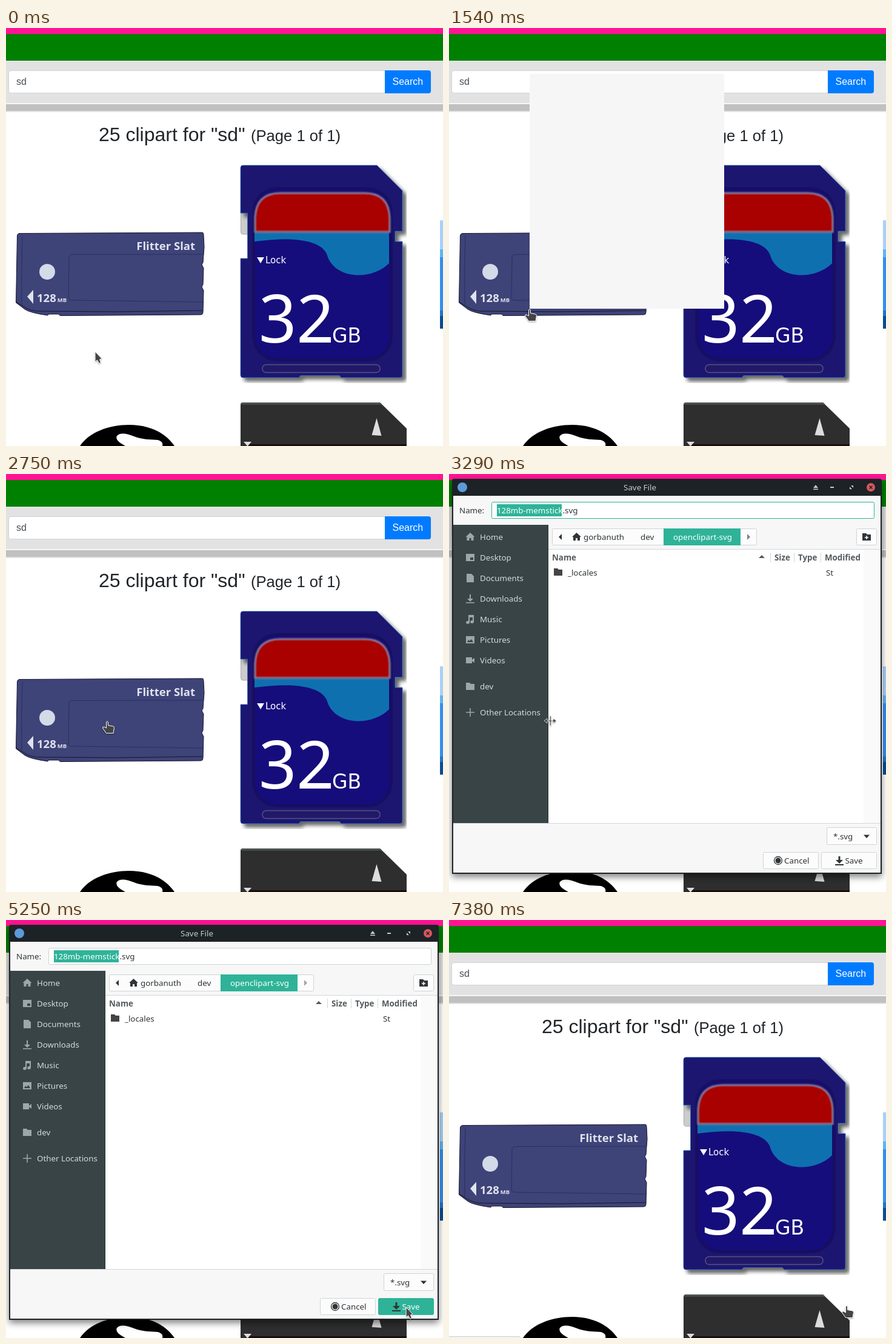
Recreate the animation shown at these times as an HTML page. Size 721 by 691 pixels, loop 7430 ms.

```html
<!DOCTYPE html>
<html lang="en">
<head>
<meta charset="utf-8">
<title>Save clipart</title>
<style>
html, body { margin: 0; width: 100%; height: 100%; overflow: hidden; background: #fff; }
svg { display: block; }
.page { font: 16px "Liberation Sans", Arial, sans-serif; fill: #212529; }
.ui { font: 13.33px "Noto Sans", sans-serif; fill: #2f3437; }
.stick text { font-family: "Noto Sans", sans-serif; font-weight: 700; fill: #dfe3ee; }
.card text { font-family: "DejaVu Sans", sans-serif; fill: #fff; }
.card .size { font-family: "Noto Sans", sans-serif; }
.btn { fill: #fcfcfc; stroke: #cfd3d4; }
.head { font-weight: 700; fill: #555b5e; }
.side { fill: #d3dadb; }
.icon { fill: #9ba8a8; }
.on { fill: #2eb398; }
.focus { stroke: #2eb398; }
.white { fill: #fff; }
#cursor path { fill: #444; stroke: #fff; stroke-linejoin: round; }
</style>
</head>
<body>
<svg width="721" height="691" viewBox="0 0 721 691">
  <defs>
    <filter id="soft" x="-10%" y="-10%" width="120%" height="120%"><feGaussianBlur stdDeviation="1"/></filter>
    <filter id="cardShade"><feDropShadow dx="6" dy="6" stdDeviation="3" flood-opacity=".6"/></filter>
    <filter id="winShade"><feDropShadow dx="0" dy="5" stdDeviation="6" flood-opacity=".5"/></filter>
    <filter id="menuShade"><feDropShadow dx="2" dy="0" stdDeviation="2" flood-opacity=".35"/></filter>
    <filter id="tiny" x="-50%" y="-50%" width="200%" height="200%"><feDropShadow dx="0" dy="1" stdDeviation="1" flood-opacity=".4"/></filter>
    <clipPath id="thumb"><path d="M380 220H661V587H380Z"/></clipPath>
  </defs>

  <g class="page">
    <path fill="#fff" d="M0 0H721V691H0Z"/>
    <path fill="#ff1493" d="M0 0H721V10H0Z"/>
    <path fill="#008000" d="M0 10H721V54H0Z"/>
    <path fill="#e2e2e2" d="M0 54H721V139H0Z"/>
    <path fill="#f6f6f6" d="M0 124H721V126H0Z"/>
    <path fill="#c0c0c0" d="M0 126H721V137H0Z"/>
    <rect x="4.5" y="70.5" width="625" height="37" rx="4" fill="#fff" stroke="#ced4da"/>
    <path fill="#007bff" d="M625 70H697q4 0 4 4V104q0 4-4 4H625Z"/>
    <text x="17" y="94" fill="#495057">sd</text>
    <text x="637.5" y="94" class="white">Search</text>
    <text x="153" y="187" font-size="32">25 clipart for "sd"</text>
    <text x="404" y="187" font-size="25.6">(Page 1 of 1)</text>

    <g class="stick">
      <path fill="#3e4378" stroke="#15172c" d="M18.500 343Q19 340 22 339.500L324 338Q326 338 326 342L327 362L325 388L323 391L326 397L325 424L323 428L326 434L325 470Q325 474 321 474L89 475.500L87 473H70L69 475Q40 471 31 465L16.500 454Z"/>
      <path fill="none" stroke="#15172c" d="M17 453L30 461Q37 466 50 468L180 469L325 467"/>
      <path fill="none" stroke="#2b3062" d="M27 343Q25 400 26 458M325 374L108 374.500Q104 375 104 380L103 445Q103 450 108 450L325 453"/>
      <circle cx="68" cy="403" r="13" fill="#d3dae8"/>
      <path fill="#dfe3ee" d="M35 444L45 433V456Z"/>
      <text x="312" y="367" font-size="18.500" text-anchor="end">Flitter Slat</text>
      <text x="51" y="453" font-size="18.500">128<tspan dx="2" font-size="9.500">MB</tspan></text>
    </g>

    <g class="card" clip-path="url(#thumb)">
      <path fill="#ccc" stroke="#aaa" d="M387.500 306H400V341H391Q387.500 341 387.500 337Z"/>
      <path fill="#1e1570" stroke="#2b6cb4" stroke-width=".8" filter="url(#cardShade)" d="M391 227H612L654 269V336H642V353H654V574Q654 578 650 578H553L550 574.500H486L483 578H391Q387 578 387 574V381H398.500V306H387V231Q387 227 391 227Z"/>
      <rect x="409" y="266" width="226" height="282" rx="38" fill="#170f7b" stroke="#120c55" stroke-width="3" filter="url(#soft)"/>
      <path fill="#0f70af" d="M410 338H632V389C604 417 546 416 531 379C524 350 475 344 410 353Z"/>
      <path fill="#a90000" d="M411 337V313Q413 273 452 273H592Q631 273 633 313V337Z"/>
      <path fill="none" stroke="#8c819c" stroke-width="3" filter="url(#soft)" d="M411 337V313Q413 273 452 273H592Q631 273 633 313V337Z"/>
      <rect x="423" y="556.500" width="194" height="13" rx="6" fill="#211968" stroke="#575184" stroke-width="1.500"/>
      <path fill="#fff" d="M414 379H426L420 389Z"/>
      <text x="428" y="389" font-size="15">Lock</text>
      <text class="size" x="417" y="520" font-size="109">32</text>
      <text x="538" y="520" font-size="33">GB</text>
    </g>

    <path fill="#a9d0fb" d="M716 318H721V366H716Z"/>
    <path fill="#62b3f4" d="M716 366H721V379H716Z"/>
    <path fill="#348ef0" d="M716 379H721V467H716Z"/>
    <path fill="#1f74cd" d="M716 467H721V476H716Z"/>
    <path fill="#0b4c92" d="M716 476H721V497H716Z"/>

    <path fill="#000" d="M122 691C137 668 170 656 203 656C238 656 264 670 278 691Z"/>
    <path fill="#fff" d="M197 691C188 686 181 682 182.500 675C187 668 199 670 211 675C226 681 240 680 250 681C258 683 259 687 258 691Z"/>
    <path fill="#2e2e2e" d="M391 619H617L661 662V691H387V623Q387 619 391 619Z"/>
    <path fill="#4c5352" d="M391 619H617L620.500 622.500H388Q388 619 391 619Z"/>
    <path fill="#1d0d0d" d="M400 688H661V691H400Z"/>
    <path fill="#ddd" d="M611.500 645L619.500 674L603.500 673ZM392 684H405L398.500 691.500Z"/>
    <path id="status" fill="#f2f2f2" stroke="#ccc" d="M-1 688.500H115Q118 688.500 118 693H-1Z"/>
  </g>

  <g id="menu" class="ui">
    <rect id="menuBox" x="133" y="76" width="321" height="388" fill="#f6f6f6"/>
    <g id="items"></g>
  </g>

  <g id="dialog" class="ui">
    <path fill="#1d2426" filter="url(#winShade)" d="M5 661V11Q5 8 8 8H711Q714 8 714 11V661Z"/>
    <path fill="#f7f7f7" d="M7 36H712V659H7Z"/>
    <circle cx="22" cy="22" r="8" fill="#5b9bd8"/>
    <text x="315" y="27" text-anchor="middle" fill="#c4cccd">Save File</text>
    <path fill="#c4cccd" d="M601 23L605 18L609 23ZM601 24.500H609V26H601ZM629 21H635V23H629ZM663 19H667V23ZM661 21V25H665Z"/>
    <circle cx="696" cy="22" r="7" fill="#d9575c"/>
    <path stroke="#1d2426" stroke-width="1.500" d="M693.500 19.500L698.500 24.500M698.500 19.500L693.500 24.500"/>

    <text x="17" y="65">Name:</text>
    <rect id="entry" class="btn white" x="70.500" y="46.500" width="631" height="27" rx="2"/>
    <path class="on" d="M79 50H186V70H79Z"/>
    <text x="79" y="65"><tspan class="white">128mb-memstick</tspan>.svg</text>

    <path fill="#fff" d="M164 125H684V577H164Z"/>
    <path fill="#fafafa" d="M684 125H712V577H684Z"/>
    <path fill="#394446" d="M7 84H164V577H7Z"/>
    <path stroke="#d2d6d7" d="M164 124.500H712M7 577.500H712M530.500 130V146M569.500 130V146M613.500 130V146"/>
    <path stroke="#2b3436" d="M163.500 84V577"/>
    <g id="places" class="side"></g>

    <rect class="btn" x="170.500" y="90.500" width="337" height="27" rx="2"/>
    <path class="on" d="M354 90H481V118H354Z"/>
    <path d="M186 99V109L181 104ZM203 104L210.500 97L218 104H216V110H212V106H209V110H205V104Z"/>
    <path id="next" fill="#7d8284" d="M492 99V109L497 104Z"/>
    <text x="222" y="109">gorbanuth</text>
    <text x="316" y="109">dev</text>
    <text x="370" y="109" class="white">openclipart-svg</text>
    <rect class="btn" x="672.500" y="90.500" width="33" height="27" rx="2"/>
    <path d="M682 98H688L690 100H696V110H682Z"/>
    <path stroke="#fff" stroke-width="1.500" d="M689 102V108M686 105H692"/>

    <g class="head">
      <text x="170" y="143">Name</text><text x="537" y="143">Size</text>
      <text x="576" y="143">Type</text><text x="620" y="143">Modified</text>
      <path d="M511 139L516 134L521 139Z"/>
    </g>
    <path d="M173 156H179L181 158H187V168H173Z" fill="#444"/>
    <text x="196" y="168">_locales</text>
    <text x="622" y="168">St</text>

    <rect class="btn" x="623.500" y="584.500" width="82" height="28" rx="2"/>
    <text x="634" y="604">*.svg</text>
    <path d="M684 596.500H694L689 602Z"/>
    <rect class="btn" x="518.500" y="625.500" width="91" height="27" rx="2"/>
    <circle cx="543" cy="639" r="6.500" fill="none" stroke="#2f3437" stroke-width="1.300"/>
    <circle cx="543" cy="639" r="4.500"/>
    <text x="553" y="644">Cancel</text>
    <rect id="save" class="btn" x="614.500" y="625.500" width="91" height="27" rx="2"/>
    <path d="M642.500 632H645.500V638H650L644 644L638 638H642.500ZM637 645H651V647H637Z"/>
    <text id="saveText" x="653.500" y="644">Save</text>
  </g>

  <g id="cursor" filter="url(#tiny)">
    <path id="arrow" d="M0 0V17L3.500 14L6.500 19.500L9.500 18L7.500 13L11 11.500Z"/>
    <path id="hand" d="M-1.500 2Q0 -.5 1.500 2V7.500L9.500 9Q11.500 9.500 11.500 11.500L10 20.500H-1.500L-7.500 12Q-8 9.500 -5 10L-1.500 12Z"/>
    <path id="resize" stroke-width=".7" d="M-.8 -8H1.200V-.8H5V-4L10 0L5 4V.8H1.200V8H-.8V.8H-5V4L-10 0L-5 -4V-.8H-.8Z"/>
  </g>
</svg>
<script>
const $ = id => document.getElementById(id);
const show = (id, on) => $(id).style.display = on ? '' : 'none';

// Sidebar: label, centre line, icon drawn around (0, 0)
const folder = 'M-7 -6H-1L1 -4H7V6H-7Z';
const places = [
  ['Home', 104, 'M-7.500 0L0 -7L7.500 0H5.500V6H1.500V2H-1.500V6H-5.500V0Z'],
  ['Desktop', 138, 'M-7 -6H7V6H-7ZM0 0V4H5V0Z'],
  ['Documents', 172, 'M-6 -7H2L6 -3V7H-6Z'],
  ['Downloads', 206, 'M-1 -7H1V0H5L0 5L-5 0H-1ZM-7 6H7V7.500H-7Z'],
  ['Music', 240, 'M-3 -7H6V4A3 2.500 0 1 1 4 2V-3H-1V5A3 2.500 0 1 1 -3 3Z'],
  ['Pictures', 274, 'M-7 -6H7V6H-7ZM-5 4H5L2 -1L-1 2L-3 0Z'],
  ['Videos', 308, 'M-7 -5H3V-1L7 -4V4L3 1V5H-7Z'],
  ['dev', 351, folder],
  ['Other Locations', 394, 'M-.8 -7H.8V-.8H7V.8H.8V7H-.8V.8H-7V-.8H-.8Z']
];
$('places').innerHTML = places.map(([name, y, d]) =>
  `<path class="icon" fill-rule="evenodd" transform="translate(35 ${y})" d="${d}"/><text x="51" y="${y + 5}">${name}</text>`).join('');

// Context menu: an empty label is a separator
const labels = ['Open link in new tab', 'Open link in new window', 'Open link in incognito window', '',
  'Save link as…', 'Copy link address', 'Copy link text', '',
  'Open image in new tab', 'Save image as…', 'Copy image', 'Copy image address', 'Search the web for image', '',
  'Save as SVG', '', 'Inspect'];
let rowY = 80;
const rows = labels.map(label => {
  const y = rowY;
  rowY += label ? 26 : 11;
  return { label, y };
});
$('items').innerHTML = rows.map(({ label, y }) => label
  ? `<g><rect x="133" y="${y}" width="320" height="26" fill="none"/><text x="157" y="${y + 18}">${label}</text></g>`
  : `<path stroke="#d5d8d9" d="M133 ${y + 5.5}H454"/>`).join('');

// Pointer moves: start, end, x, y, sideways bow
const moves = [
  [450, 1040, 133, 464, 31], [2030, 2420, 167, 408], [3610, 3920, 556, 587],
  [4079, 4080, 670, 641], [4289, 4290, 652, 643], [4450, 4540, 660, 640],
  [6780, 6920, 655, 640], [7379, 7380, 656, 637]
];
function pointer(t) {
  let x = 147, y = 535;
  for (const [from, to, endX, endY, bow = 0] of moves) {
    const u = Math.min(1, Math.max(0, (t - from) / (to - from)));
    const e = u * u * (3 - 2 * u);
    x += (endX - x) * e + bow * Math.sin(Math.PI * e);
    y += (endY - y) * e;
  }
  return [x, y];
}

function draw(now) {
  const t = now % 7430, within = (a, b) => t >= a && t < b;
  const [x, y] = pointer(t);
  const filled = within(1630, 2750), dialog = within(3290, 5630), saving = t >= 5170;
  show('menu', within(1540, 2750));
  show('items', filled);
  $('menuBox').setAttribute('filter', filled ? 'url(#menuShade)' : 'none');
  rows.forEach((row, i) => {
    if (!row.label) return;
    const hover = x > 134 && y >= row.y && y < row.y + 26;
    const [box, text] = $('items').children[i].children;
    box.setAttribute('class', hover ? 'on' : '');
    text.setAttribute('class', hover ? 'white' : '');
  });

  show('dialog', dialog);
  $('entry').classList.toggle('focus', !saving);
  $('next').style.opacity = t < 3420 ? 1 : .7;
  $('save').classList.toggle('on', saving);
  $('save').classList.toggle('focus', saving);
  $('saveText').classList.toggle('white', saving);
  show('status', t >= 5920);

  const kind = within(3290, 3630) ? 'resize'
    : dialog || filled || y > 475 && t < 1040 ? 'arrow' : 'hand';
  for (const id of ['arrow', 'hand', 'resize']) show(id, id === kind);
  $('cursor').setAttribute('transform', `translate(${x} ${y})`);
  requestAnimationFrame(draw);
}
requestAnimationFrame(draw);
</script>
</body>
</html>
```
